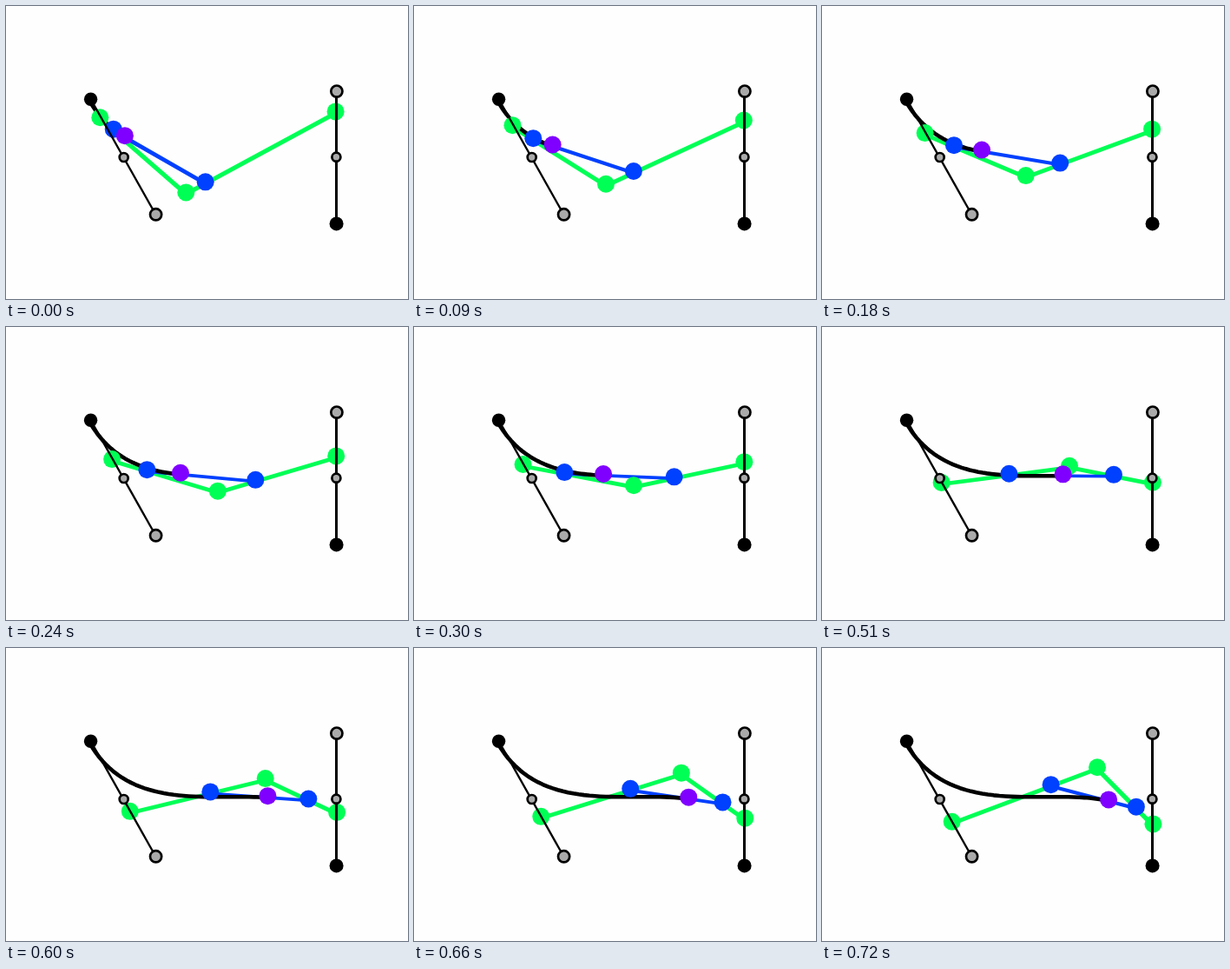
Write an HTML page that moves like this. It is 463 px wide and 337 px high and loops after 0.75 s.

```html
<!DOCTYPE html>
<html lang="en">
<head>
<meta charset="utf-8">
<title>Curve construction</title>
<style>
html, body { margin: 0; width: 100%; height: 100%; overflow: hidden; background: #fefefe; }
svg { display: block; width: 463px; height: 337px; }
line, polyline { fill: none; stroke-linecap: round; stroke-linejoin: round; }
.green { stroke: #00ff55; }
.blue { stroke: #0040ff; }
.ink { stroke: #000; }
.knob { fill: #aaa; stroke: #000; stroke-width: 2.7; }
</style>
</head>
<body>
<svg viewBox="0 0 463 337">
  <!-- strokes sit a little below the dot centres -->
  <g transform="translate(0 1.9)">
    <line id="ga" class="green"/>
    <line id="gb" class="green"/>
    <line id="bl" class="blue"/>
    <polyline id="curve" class="ink" stroke-width="4.6"/>
  </g>
  <g fill="#00ff55">
    <circle id="g1" r="10"/><circle id="g2" r="10"/><circle id="g3" r="10"/>
  </g>
  <g fill="#0040ff">
    <circle id="b1" r="10"/><circle id="b2" r="10"/>
  </g>
  <circle id="pen" r="10" fill="#8000ff"/>
  <line class="ink" x1="97.5" y1="107" x2="172.5" y2="240" stroke-width="2.4"/>
  <line class="ink" x1="380.5" y1="98" x2="380.5" y2="250.5" stroke-width="3"/>
  <circle cx="97.6" cy="107.2" r="7.7"/>
  <circle cx="380.6" cy="250.4" r="8"/>
  <circle class="knob" cx="172.6" cy="239.8" r="6.6"/>
  <circle class="knob" cx="380.9" cy="98.1" r="6.6"/>
  <circle class="knob" cx="135.7" cy="174" r="5"/>
  <circle class="knob" cx="380.4" cy="173.7" r="5"/>
</svg>
<script>
const LOOP = 750, STEP = 30, START = [97.5, 107], LEAD = -0.3;
const el = id => document.getElementById(id);
const mix = (a, b, u) => a + (b - a) * u;
const lerp = (p, q, u) => [mix(p[0], q[0], u), mix(p[1], q[1], u)];

// Nested interpolation; s runs from 0 to 1 over the loop.
function pose(s) {
  const g1 = lerp([108.3, 128.2], [149.7, 199.8], s);
  const g2 = lerp([207.3, 214.4], [317, 137.2], s);
  const g3 = lerp([379.6, 121.4], [381.4, 202.4], s);
  const b1 = lerp(g1, g2, mix(0.156, 0.681, s));
  const b2 = lerp(g2, g3, mix(0.13, 0.697, s));
  const pen = lerp(b1, b2, mix(0.124, 0.677, s));
  return { g1, g2, g3, b1, b2, pen };
}

function join(id, p, q, base, extra) {
  const dx = q[0] - p[0], dy = q[1] - p[1], line = el(id);
  const width = base + extra * Math.abs(dy) / Math.hypot(dx, dy);
  const set = { x1: p[0], y1: p[1], x2: q[0], y2: q[1], "stroke-width": width };
  for (const k in set) line.setAttribute(k, set[k]);
}

function trail(s) {
  const pts = [START], n = 40;
  for (let i = 1; i <= n; i++) pts.push(pose(mix(LEAD, s, i / n)).pen);
  return pts.map(p => p.map(v => v.toFixed(2)).join()).join(" ");
}

function draw(ms) {
  const s = Math.floor((ms % LOOP) / STEP) * STEP / (LOOP - STEP);
  const now = pose(s);
  for (const id in now) {
    el(id).setAttribute("cx", now[id][0]);
    el(id).setAttribute("cy", now[id][1]);
  }
  join("ga", now.g1, now.g2, 4.5, 1);
  join("gb", now.g2, now.g3, 4.5, 1);
  join("bl", now.b1, now.b2, 3.6, 2.4);
  el("curve").setAttribute("points", trail(s));
}

function tick() {
  draw(performance.now());
  requestAnimationFrame(tick);
}
tick();
</script>
</body>
</html>
```
